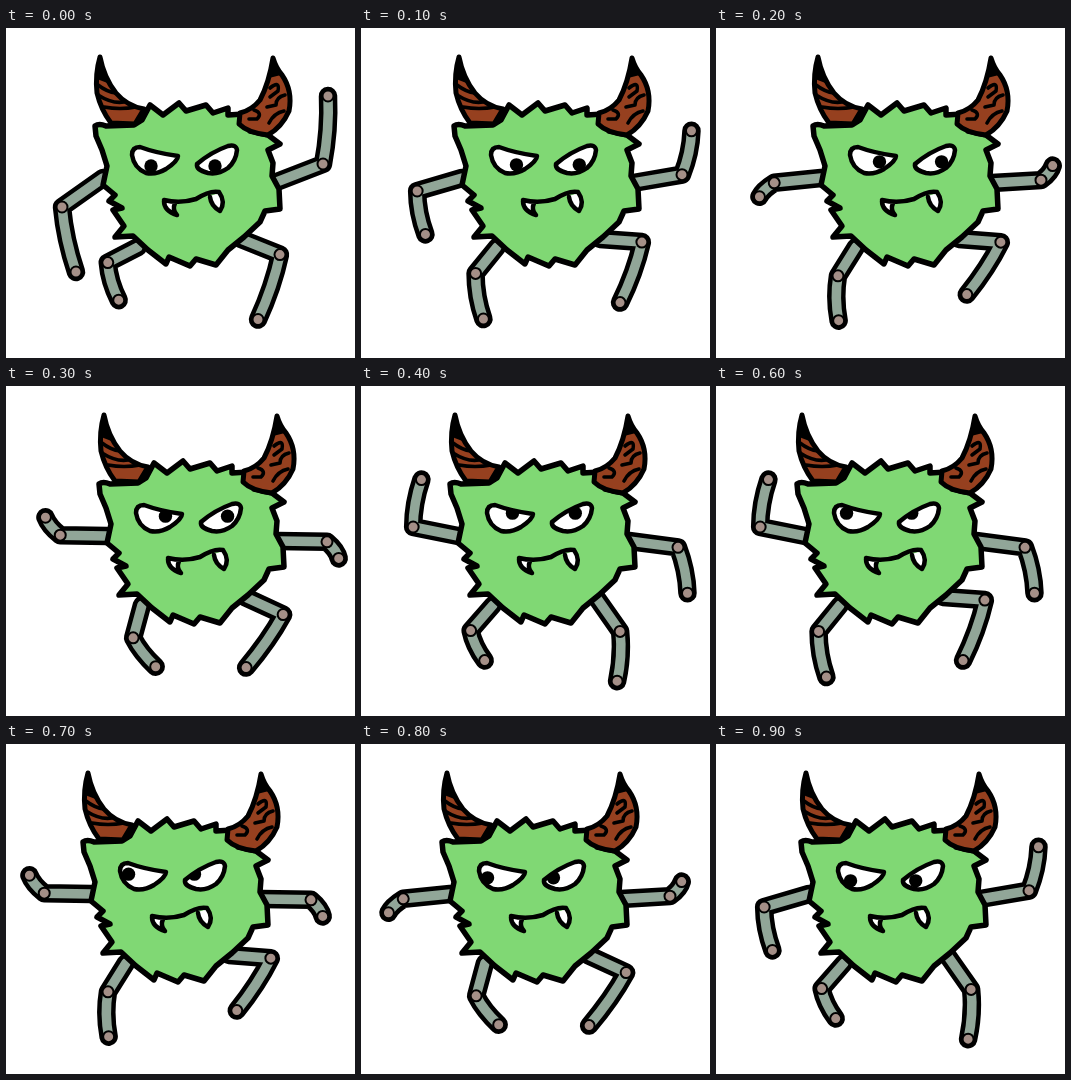
Write an HTML page that moves like this. It is 349 px wide and 330 px high and loops after 1 s.

```html
<!DOCTYPE html>
<html lang="en">
<head>
<meta charset="utf-8">
<title>Dancing monster</title>
<style>
  html, body { margin: 0; width: 100%; height: 100%; overflow: hidden; background: #fff; }
  svg { display: block; width: 100vw; height: 100vh; }
  path, circle { stroke-linecap: round; stroke-linejoin: round; }
  .body { fill: #80d874; stroke: #000; stroke-width: 5.5; }
  .horn { fill: #96401f; stroke: #000; stroke-width: 5; }
  .thin { fill: none; stroke: #000; stroke-width: 3.6; }
  .white { fill: #fff; }
  .line { fill: none; stroke: #000; stroke-width: 4.5; }
  .edge { fill: none; stroke: #000; stroke-width: 18.5; }
  .limb { fill: none; stroke: #91a698; stroke-width: 9.5; }
  .joint { fill: #a48f87; stroke: #000; stroke-width: 2; }
</style>
</head>
<body>
<svg viewBox="0 0 349 330">
  <defs>
    <path id="eyeL" d="M126 127Q126 119 134 119Q150 125 172 128Q172 133 160 141Q150 147 140 145Q128 140 126 127Z"/>
    <path id="eyeR" d="M191 136Q205 124 222 118Q230 116 231 122Q230 133 222 140Q212 147 202 145Q190 142 191 136Z"/>
    <clipPath id="clipL"><use href="#eyeL"/></clipPath>
    <clipPath id="clipR"><use href="#eyeR"/></clipPath>
  </defs>
  <g id="monster">
    <g id="limbs"></g>
    <path class="body" d="M89 98Q93 95 100 98L128 97L136 92L144 77L157 87L173 75L180 83L200 77L207 85L222 80L222 87L238 86L244 103L262 107L274 116L262 122L267 135L266 148L273 161L274 181L259 183L254 194L238 209L222 222L210 237L190 231L184 238L163 229L160 236L142 222L127 208L109 209L118 198L107 182L116 180L103 173L109 167L97 157L101 138L96 122L90 108Z"/>
    <path class="horn" d="M94 29Q89 46 91 65Q95 82 105 95L129 96L138 81Q121 78 110 65Q98 50 94 29Z"/>
    <path d="M94 29L91 51L104 56Z"/>
    <path class="thin" d="M92 57Q101 64 110 65M92 67Q106 76 118 74M98 79Q114 82 130 79"/>
    <path class="horn" d="M267 30Q263 55 254 72Q246 82 234 85L233 96Q242 105 262 107Q276 99 283 83Q287 63 276 47Q270 40 267 30Z"/>
    <path d="M267 30L263 50L275 47Z"/>
    <path class="thin" d="M264 60Q274 52 272 63L264 69M279 67Q270 69 270 77L261 79M248 82Q257 85 251 91L243 91M278 83Q268 85 263 95"/>
    <use href="#eyeL" class="white"/>
    <g clip-path="url(#clipL)"><circle id="pupilL" r="6.7"/></g>
    <use href="#eyeL" class="line"/>
    <use href="#eyeR" class="white"/>
    <g clip-path="url(#clipR)"><circle id="pupilR" r="6.7"/></g>
    <use href="#eyeR" class="line"/>
    <path class="white" d="M158 173Q158 183 171 187Q166 182 169 174ZM204 168Q205 179 214 183Q219 176 214 165Z"/>
    <path class="line" d="M158 172Q174 176 190 171Q204 162 213 164Q220 174 214 183Q205 178 204 169M158 173Q158 183 171 187Q166 182 169 175"/>
  </g>
</svg>
<script>
const $ = id => document.getElementById(id);
const { abs, cos, sin, PI } = Math;
const start = performance.now();

// Two harmonics around a mean value.
const wave = (a, mean, amp, phase, amp2 = 0, phase2 = 0) =>
  mean + amp * cos(a - phase) + amp2 * cos(2 * a - phase2);

// Point at a distance, turned from straight down towards positive x.
function reach([x, y], length, degrees) {
  const r = degrees * PI / 180;
  return [x + length * sin(r), y + length * cos(r)];
}

// side is -1 on the left and 1 on the right; the outer half bows outwards.
function limb(side, root, mid, end) {
  const bend = [(mid[0] + end[0]) / 2 + side * 4, (mid[1] + end[1]) / 2];
  const d = `M${root}L${mid}Q${bend} ${end}`;
  const joint = ([x, y]) => `<circle class="joint" cx="${x}" cy="${y}" r="5.5"/>`;
  return `<path class="edge" d="${d}"/><path class="limb" d="${d}"/>` + joint(mid) + joint(end);
}

// u runs from 1 to -1 and back: one arm falls while the other rises.
function arms(u) {
  const lift = u + u ** 3;
  return limb(-1, [97, 150],
      [50 + 6 * u * u, 152 + 13.5 * lift],
      [20 + 50 * sin(abs(u) * PI / 2), 150 + 94 * u]) +
    limb(1, [268, 155],
      [317, 154 - 9 * lift],
      [329 - 7 * u * u, 155 - 87 * u]);
}

function leg(side, root, thigh, thighTurn, shin, shinTurn) {
  const knee = reach(root, thigh, side * thighTurn);
  return limb(side, root, knee, reach(knee, shin, -side * shinTurn));
}

function legs(a) {
  return leg(-1, [132, 219],
      34, wave(a, 38, 20, 0.16, 8.5, -0.95),
      wave(a, 40, 7, 1.7), wave(a, 18, 14.7, -1.69, 10.5, 1.57)) +
    leg(1, [235, 211],
      42, wave(a, 68, 25, 1.84, 8, 0.55),
      wave(a, 62, 5, 1.5, 7.5, 0.6), wave(a, 22, 13, 2.68, 9.5, 0.5));
}

function place(el, x, y) {
  el.setAttribute("transform", `translate(${x} ${y})`);
}

function draw() {
  const step = Math.floor((performance.now() - start) % 1000 / 100);
  const turn = step * PI / 5;
  const gazeX = sin(turn), gazeY = 132 + 6 * cos(turn);

  // Sway is a triangle wave, 10 px to each side of -2.
  place($("monster"), 4 * abs((step + 3) % 10 - 5) * -1 + 8, 0);
  place($("monster"), 4 * (5 - abs((step + 3) % 10 - 5)) - 12, 0);
  place($("pupilL"), 145 + 11 * gazeX, gazeY);
  place($("pupilR"), 209 + 9 * gazeX, gazeY);
  $("limbs").innerHTML = arms(abs(step - 5) / 2.5 - 1) + legs(2 * turn);
  requestAnimationFrame(draw);
}
draw();
</script>
</body>
</html>
```
